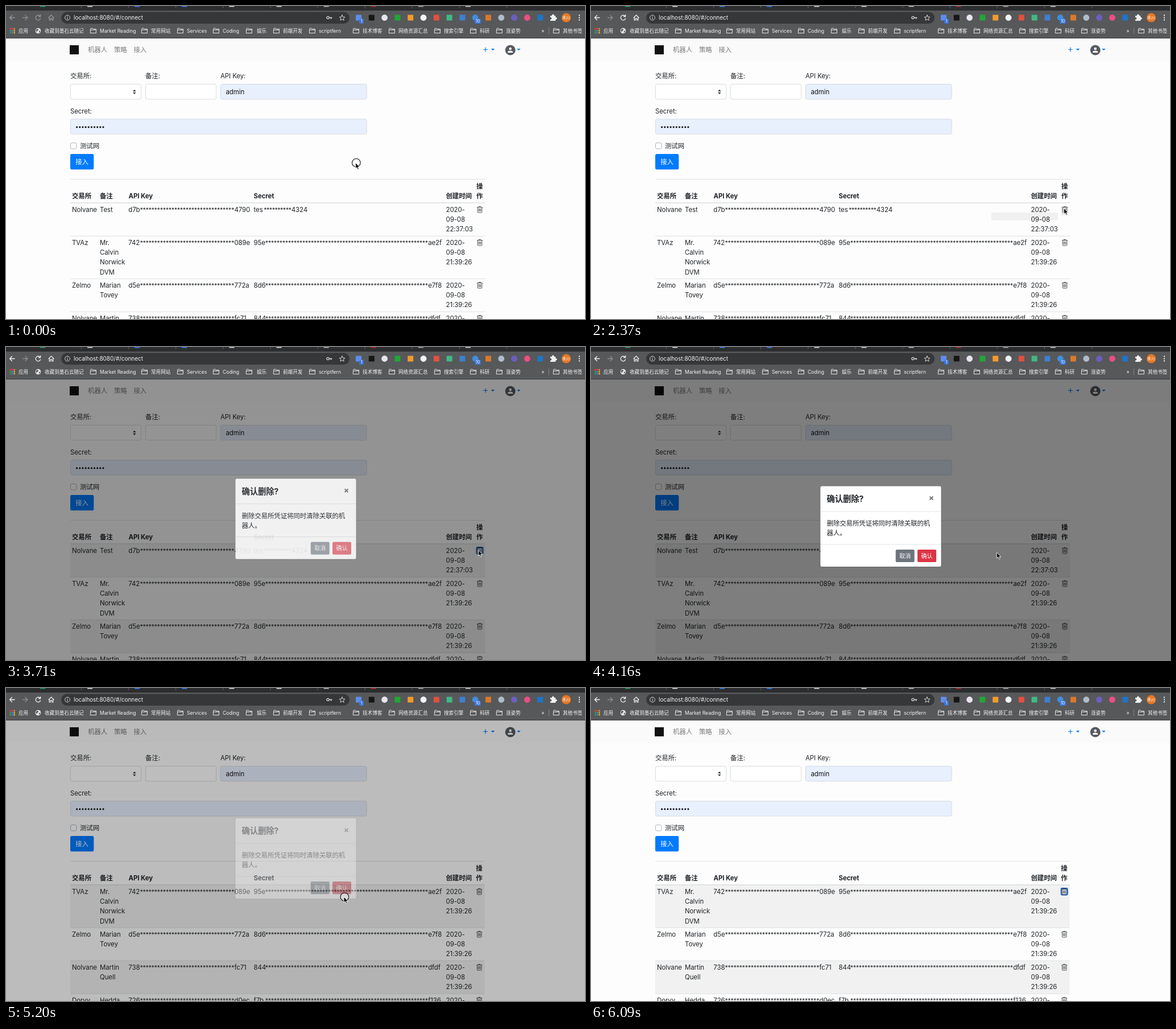
Animation of 1018x550 px, one loop 6690 ms. Source, as an HTML page:

```html
<!DOCTYPE html>
<html lang="zh-CN">
<head>
<meta charset="utf-8">
<title>Connect</title>
<style>
html, body { margin: 0; width: 100%; height: 100%; overflow: hidden; background: #fdfdfd; }
svg { display: block; width: 100vw; height: 100vh; }
text { font-family: Inter, "Noto Sans CJK SC", "Noto Sans CJK", sans-serif; font-size: 11.44px; fill: #212529; letter-spacing: -0.08px; white-space: pre; }
.b { font-weight: 700; }
.mark { font-size: 8.58px; fill: #f4f4f4; letter-spacing: 0; }
.line { fill: none; stroke-linecap: round; stroke-linejoin: round; }
</style>
</head>
<body>
<svg id="stage" viewBox="0 0 1018 550" xmlns="http://www.w3.org/2000/svg"></svg>
<script>
const LOOP = 6690;
const BAR = '#57585a', FIELD = '#363739', BLUE = '#007bff';

const rect = (x, y, w, h, fill, more = '') =>
  `<rect x="${x}" y="${y}" width="${w}" height="${h}" fill="${fill}" ${more}/>`;
const dot = (x, y, r, fill, more = '') => `<circle cx="${x}" cy="${y}" r="${r}" fill="${fill}" ${more}/>`;
const shape = (d, fill, more = '') => `<path d="${d}" fill="${fill}" ${more}/>`;
const line = (d, color, width = 1, more = '') =>
  `<path class="line" d="${d}" stroke="${color}" stroke-width="${width}" ${more}/>`;
const text = (x, y, s, more = '') => `<text x="${x}" y="${y}" ${more}>${s}</text>`;
const group = (id, body) => `<g id="${id}">${body}</g>`;

// ---- browser chrome ----
function tabs() {
  const colors = ['#1fa463', '#ddd', '#3b82f6', '#3b82f6', '#ddd', '#ddd', '#bbb', '#c0282d', '#aaa', '#ccc'];
  return rect(0, 0, 1018, 8, '#2c2d2f') + colors.map((c, i) => {
    const x = 60 + i * 83.1;
    return rect(x, 0, 9, 1.5, c) + rect(x + 72, 0, 1, 4, '#5c5d60');
  }).join('');
}

function navIcons() {
  return line('M15 20.5H6.5M10.5 16.5L6.5 20.5L10.5 24.5', 'currentColor', 1.3) +
    line('M29.5 20.5H38M34 16.5L38 20.5L34 24.5', '#8d8e91', 1.3) +
    line('M60 18A4.3 4.3 0 1 0 60.6 22M60.6 15.5V18.6H57.5', 'currentColor', 1.3) +
    line('M75 20.5L79.5 16L84 20.5M76.2 20V25H78.2V21.8H80.8V25H82.8V20', 'currentColor', 1.2);
}

function extensions() {
  const list = [['#5f8dee', 0], ['#161616', 0], ['#e9e4f0', 1], ['#21a637', 0], ['#f39a2d', 0], ['#f2f5f8', 1],
    ['#e2503f', 0], ['#41b883', 0], ['#3e7fd0', 0], ['#3f8ee0', 1], ['#d9792b', 0], ['#aebccb', 1],
    ['#6b5fc0', 1], ['#ee4d84', 1], ['#1f74c8', 0]];
  let s = list.map(([c, round], i) => {
    const x = 620 + i * 22.8;
    return round ? dot(x, 20.5, 5.4, c) : rect(x - 5, 15.5, 10, 10, c, 'rx="1"');
  }).join('');
  const badge = (x, w, n) => rect(x - w / 2, 22.5, w, 8.5, '#3c78e0', 'rx="1.5"') +
    text(x, 29.4, n, 'text-anchor="middle" style="font-size:7px;fill:#fff"');
  s += badge(625, 7.5, 1) + badge(829.5, 10.5, 10);
  s += shape('M957 17H960A1.9 1.9 0 1 1 963.6 17H966.3V20A1.9 1.9 0 1 1 966.3 23.6V26H957V23.4A1.8 1.8 0 1 0 957 20Z', '#f1f1f1');
  s += dot(985, 20.5, 8, '#e87722') +
    text(985, 23.2, '禾川', 'text-anchor="middle" style="font-size:7px;fill:#fff"');
  return s + [16.5, 20.5, 24.5].map(y => dot(1008, y, 1.15, '#f1f1f1')).join('');
}

function bookmarks() {
  const names = [[148, 'Market Reading'], [238, '常用网站'], [301, 'Services'], [364, 'Coding'], [422, '娱乐', 2],
    [470, '前端开发'], [533, 'scriptfern'], [610, '技术博客'], [673, '网络资源汇总'], [753, '搜索引擎'],
    [816, '科研'], [862, '涨姿势'], [962, '其他书签']];
  const folder = x => line(`M${x + .6} 40Q${x + .6} 39.2 ${x + 1.4} 39.2H${x + 4.2}L${x + 5.4} 40.6H${x + 10.4}V47.6H${x + .6}ZM${x + .6} 42H${x + 10.4}`, '#e8e8e8', 1);
  const hues = ['#ea4335', '#ea4335', '#f28b3c', '#34a853', '#4285f4', '#fbbc05', '#34a853', '#4285f4', '#fbbc05'];
  let s = hues.map((c, i) => rect(6.5 + i % 3 * 3.5, 38.8 + (i / 3 | 0) * 3.5, 2.4, 2.4, c)).join('');
  s += text(22, 46.6, '应用', 'class="mark"');
  s += dot(56.5, 43.5, 4.8, '#eee') + shape('M53 41L56 40L57.5 42L55 43.5L54.5 46L52.5 43.5ZM58 44L60.5 43L59.5 46L57.5 47Z', BAR);
  s += text(68, 46.6, '收藏到墨石云随记', 'class="mark"');
  s += names.map(([x, n, d = 0]) => folder(x) + text(x + 17 + d, 46.6, n, 'class="mark"')).join('');
  return s + text(941.5, 46.6, '»', 'class="mark"') + rect(954, 37.5, 1, 12, '#808184');
}

function browser() {
  const pale = '#d5d5d5';
  return rect(0, 0, 1018, 57, BAR) + tabs() + group('nav', navIcons()) +
    rect(97, 10.5, 507, 20.5, FIELD, 'rx="10.2"') +
    dot(108, 20.5, 4.4, 'none', `stroke="${pale}"`) + rect(107.5, 19.8, 1.1, 3.2, pale) + rect(107.5, 17.8, 1.1, 1.1, pale) +
    text(119, 24.2, 'localhost:8080/#/connect', 'style="font-size:10px;fill:#f4f4f4;letter-spacing:-.02px"') +
    dot(566, 20.5, 2.1, 'none', `stroke="${pale}" stroke-width="1.3"`) + line('M568.5 20.5H573M571.5 20.5V22.3', pale, 1.3) +
    line('M591 15.8L592.4 19.1L596 19.4L593.3 21.7L594.1 25.2L591 23.3L587.9 25.2L588.7 21.7L586 19.4L589.6 19.1Z', pale) +
    extensions() + bookmarks() + rect(0, 56, 1018, 1, '#3a3b3d');
}

// ---- page ----
function header() {
  const caret = x => shape(`M${x - 3.2} 75H${x + 3.2}L${x} 78.3Z`, BLUE);
  const link = (x, s) => text(x, 81.3, s, 'style="fill:#7c7c7c"');
  return rect(0, 57, 1018, 40, '#fafafa') + rect(112, 69, 16, 16, '#111') +
    link(144, '机器人') + link(190, '策略') + link(224.5, '接入') +
    line('M839.5 76.5H846.5M843 73V80', BLUE, 1.2) + caret(856) +
    dot(886.7, 77.5, 9, '#565b60') + dot(886.7, 75, 2.3, '#fff') +
    shape('M882 82Q882 78.6 886.7 78.6Q891.4 78.6 891.4 82Z', '#fff') + caret(901.5);
}

function form() {
  const box = (x, y, w, fill) => rect(x + .4, y + .4, w - .8, 26.4, fill, 'stroke="#ced4da" stroke-width=".8" rx="2.8"');
  const bullets = Array.from({ length: 10 }, (_, i) => dot(124.6 + i * 5.15, 212.8, 1.6, '#111')).join('');
  return text(113, 127.2, '交易所:') + text(245, 127.2, '备注:') + text(377, 127.2, 'API Key:') +
    box(113, 137, 125, '#fff') + box(245, 137, 125, '#fff') + box(377, 137, 257.5, '#e8f0fe') +
    shape('M223 150L225.8 146.8L228.6 150ZM223 151.8H228.6L225.8 155Z', '#343a40') +
    text(386.5, 155.2, 'admin', 'style="fill:#111"') +
    text(113, 188.6, 'Secret:') + box(113, 198.3, 521.5, '#e8f0fe') + bullets +
    rect(113.5, 240.5, 10.5, 10.5, '#fff', 'stroke="#adb5bd" rx="2.5"') + text(130, 250, '测试网') +
    rect(113, 260, 41.3, 27.2, BLUE, 'rx="2.8"') + text(122.2, 278, '接入', 'style="fill:#fff"');
}

// ---- table ----
const rows = [
  { ex: 'Nolvane', who: ['Test'], key: ['d7b', '4790'], sec: ['tes', '4324'], stars: 10, end: '22:37:03' },
  { ex: 'TVAz', who: ['Mr.', 'Calvin', 'Norwick', 'DVM'], key: ['742', '089e'], sec: ['95e', 'ae2f'] },
  { ex: 'Zelmo', who: ['Marian', 'Tovey'], key: ['d5e', '772a'], sec: ['8d6', 'e7f8'] },
  { ex: 'Nolvane', who: ['Martin', 'Quell'], key: ['738', 'fc71'], sec: ['844', 'dfdf'] },
  { ex: 'Dorvy', who: ['Hedda', 'Brinn'], key: ['726', 'd0ec'], sec: ['f7b', 'f136'] }
];

function masked(x, y, [head, tail], n) {
  const [from, step] = n > 10 ? [x + 20.3, 5.02] : [x + 18, 4.8];
  const xs = Array.from({ length: n }, (_, i) => (from + (i + .5) * step).toFixed(1)).join(' ');
  return text(x, y, head) + text(xs, y, '*'.repeat(n), 'text-anchor="middle" style="letter-spacing:0;font-size:10.5px"') +
    text(from + n * step + .2, y, tail);
}

const trash = (x, y) => line(`M${x - 4.7} ${y - 4}H${x + 4.7}M${x - 1.7} ${y - 4.2}V${y - 5.4}H${x + 1.7}V${y - 4.2}` +
  `M${x - 3.8} ${y - 3.8}V${y + 4.2}Q${x - 3.8} ${y + 5.2} ${x - 2.8} ${y + 5.2}H${x + 2.8}Q${x + 3.8} ${y + 5.2} ${x + 3.8} ${y + 4.2}V${y - 3.8}` +
  `M${x - 1.8} ${y - 1.6}V${y + 2.9}M${x} ${y - 1.6}V${y + 2.9}M${x + 1.8} ${y - 1.6}V${y + 2.9}`, '#2b2f33', .8);

function table(list, right) {
  const width = right - 113, rule = '#dadde0';
  let y = 346, fills = '', body = '';
  list.forEach((r, i) => {
    const h = r.who.length > 3 ? 75 : 58, base = y + 16.1;
    const stack = (x, words) => words.map((w, k) => text(x, base + k * 17.15, w)).join('');
    if (i % 2 === 0) fills += rect(113, y, width, h, '#f1f1f1');
    if (i) body += rect(113, y - .2, width, .9, rule);
    body += text(116, base, r.ex) + stack(165, r.who) +
      masked(215.3, base, r.key, 33) + masked(435.5, base, r.sec, r.stars || 57) +
      stack(773.5, ['2020-', '09-08', r.end || '21:39:26']) + trash(right - 9.3, y + 11.8);
    y += h;
  });
  const head = [[116, '交易所'], [165, '备注'], [215.5, 'API Key'], [435.5, 'Secret'], [773.5, '创建时间'], [right - 15.2, '作']];
  return `<g class="stripes">${fills}</g>` + body +
    rect(113, 304, width, .9, rule) + rect(113, 345.2, width, 1.4, rule) +
    head.map(([x, s]) => text(x, 338.2, s, 'class="b"')).join('') + text(right - 15.2, 321, '操', 'class="b"');
}

const focusBox = x => rect(x - 5.6, 352, 11.2, 11.6, '#dfe5ee', 'stroke="#1558b8" stroke-width="1.8" rx="1.5"') + trash(x, 357.8);

function dialog() {
  const button = (id, x, fill, s) => rect(x, 355.9, 33, 22.2, fill, `id="${id}" rx="2.2"`) +
    text(x + 16.5, 370.7, s, 'text-anchor="middle" style="font-size:10px;fill:#fff"');
  return rect(402.6, 243.9, 213.7, 142.8, '#000', 'fill-opacity=".2" rx="3.4"') +
    rect(403.3, 244.6, 212.3, 141.4, '#fff', 'rx="2.8"') +
    text(414.5, 272.2, '确认删除?', 'style="font-size:14.3px;font-weight:700"') +
    line('M595.6 262.7L601.4 268.5M601.4 262.7L595.6 268.5', '#777', 2, 'style="stroke-linecap:butt"') +
    rect(403.3, 288.5, 212.3, .9, '#dee2e6') + rect(403.3, 346.5, 212.3, .9, '#dee2e6') +
    text(414.5, 313.9, '删除交易所凭证将同时清除关联的机') + text(414.5, 331, '器人。') +
    group('buttons', button('cancel', 535.7, '#6c757d', '取消') + button('confirm', 574, '#dc3545', '确认'));
}

const stage = document.getElementById('stage');
stage.innerHTML = rect(0, 57, 1018, 493, '#fdfdfd') + header() + form() +
  group('hover', rect(113, 346.5, 729, 57.3, '#efefef')) +
  group('patch', rect(704, 363, 117, 13.5, '#f0f0f0') + rect(826, 352, 13, 16, '#efefef')) +
  group('before', table(rows, 842.3)) + group('after', table(rows.slice(1), 841.5)) +
  group('focus', '') + rect(0, 57, 1018, 493, '#000', 'id="shade"') + group('modal', dialog()) + browser() +
  group('ring', dot(0, 0, 7.3, '#fff', 'fill-opacity=".25" stroke="#111" stroke-width="1.1"')) +
  group('cursor', shape('M0 0V10.2L2.4 8L4 11.8L5.9 11L4.3 7.4H7.4Z', '#000', 'stroke="#fff" stroke-width=".9" stroke-linejoin="round"'));

// ---- motion ----
const $ = id => document.getElementById(id);
const show = (id, on) => $(id).style.display = on ? '' : 'none';
const ticks = [0, 150, 590, 740, 890, 1040, 1190, 1330, 1480, 1630, 1780, 2220, 2370, 2660, 3110, 3260,
  3560, 3710, 3860, 4010, 4160, 4310, 4460, 4610, 5060, 5200, 5350, 5490, 5640, 5790, 6090];
// start, end, x, y of each pointer move
const moves = [[440, 1630, 831, 356], [1630, 1780, 831.5, 355.5], [2960, 3260, 830.5, 357],
  [3860, 4460, 596, 365], [4460, 4610, 594, 367], [5350, 5790, 946.5, 536.5]];

function pointer(t) {
  let x = 614.5, y = 275.5;
  for (const [a, b, tx, ty] of moves) {
    const p = Math.min(1, Math.max(0, (t - a) / (b - a))), e = p * p * (3 - 2 * p);
    x += (tx - x) * e;
    y += (ty - y) * e;
  }
  return [x, y];
}

function draw(ms) {
  const t = ticks.filter(v => v <= ms).pop();
  const within = (a, b) => t >= a && t < b;
  const [x, y] = pointer(t);
  const gone = t >= 5200;

  $('nav').style.color = t < 2220 ? '#97989b' : '#f1f1f1';
  show('before', !gone);
  show('after', gone);
  document.querySelectorAll('.stripes').forEach(g => g.style.display = t >= 3710 ? '' : 'none');
  show('patch', within(1630, 2660));
  show('hover', within(2660, 3710));

  const focused = within(3560, 3860) || t >= 5350;
  $('focus').innerHTML = focused ? focusBox(gone ? 832.2 : 833) : '';

  const open = within(3860, 5200), entering = within(3710, 3860), leaving = within(5200, 5350);
  $('shade').setAttribute('opacity', open ? .5 : entering ? .42 : leaving ? .26 : 0);
  show('modal', open || entering || leaving);
  $('modal').setAttribute('opacity', entering ? .88 : leaving ? .35 : 1);
  $('modal').setAttribute('transform', `translate(0 ${entering ? -13.3 : leaving ? -15.8 : 0})`);
  $('buttons').setAttribute('opacity', entering ? .65 : 1);
  $('confirm').setAttribute('fill', t >= 4610 ? '#c82333' : '#dc3545');

  show('ring', t < 150 || within(2220, 2370) || within(3560, 3710) || leaving);
  $('ring').setAttribute('transform', `translate(${x + 1.3} ${y})`);
  show('cursor', t < 6090);
  $('cursor').setAttribute('transform', `translate(${x} ${y})`);
}

function loop(now) {
  draw(now % LOOP);
  requestAnimationFrame(loop);
}
draw(0);
requestAnimationFrame(loop);
</script>
</body>
</html>
```
